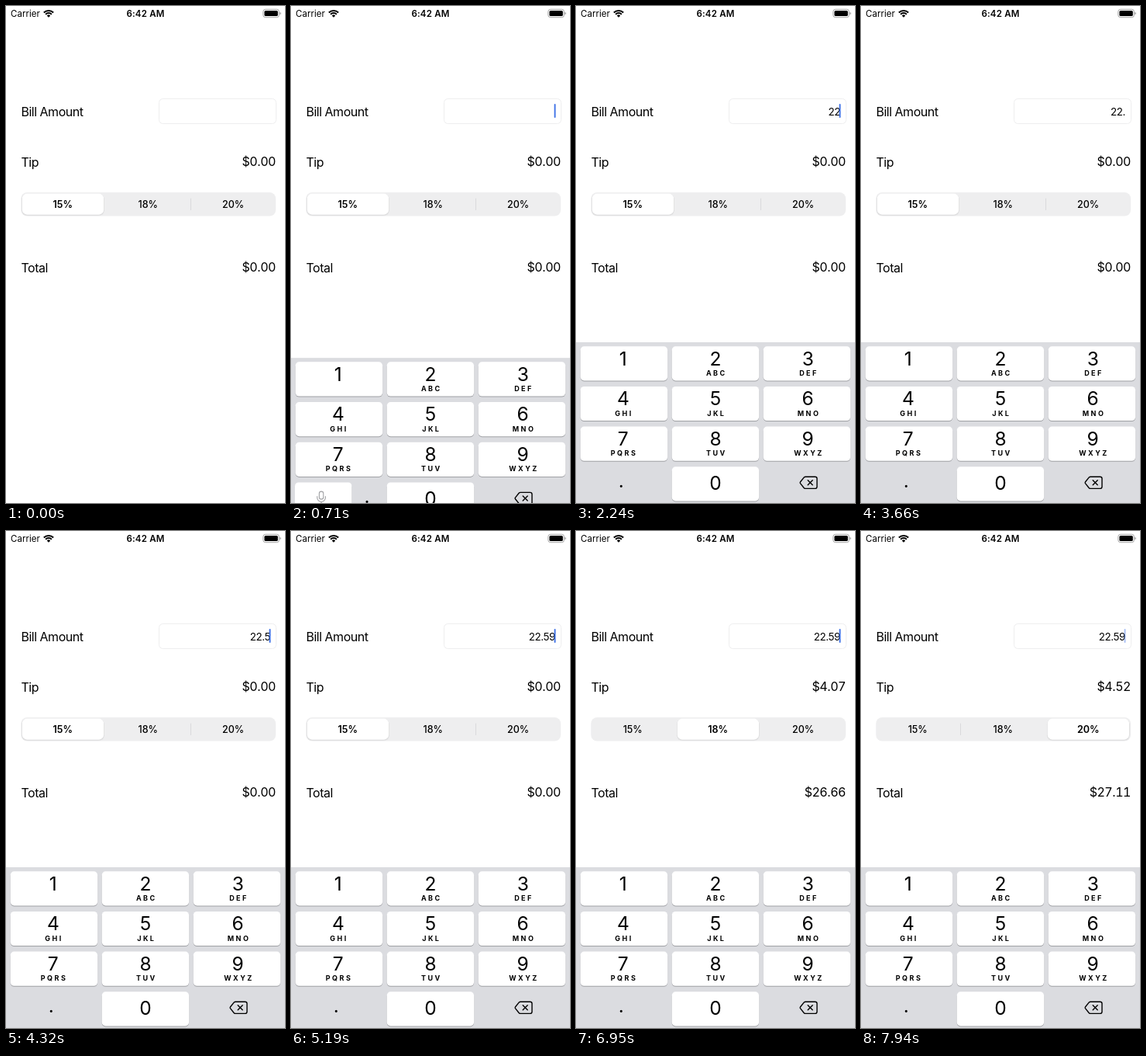
Recreate the animation shown at these times as an HTML page. Size 360 px wide and 640 px high, loop 8000 ms.

```html
<!DOCTYPE html>
<html lang="en">
<head>
<meta charset="utf-8">
<title>Tip calculator</title>
<style>
  html, body { margin: 0; width: 100%; height: 100%; overflow: hidden; background: #fff; }
  svg { display: block; width: 100%; height: 100%; }
  text { font-family: Inter, Roboto, "Liberation Sans", sans-serif; fill: #000; white-space: pre; }
  .body { font-size: 16px; letter-spacing: -.45px; font-variant-numeric: tabular-nums; }
  .field { font-size: 13.4px; letter-spacing: -.42px; }
  .seg { font-size: 12.5px; }
  .digit { font-size: 24.5px; }
  .sub { font-size: 9px; font-weight: 700; letter-spacing: 2.5px; }
  .status { font-size: 11.5px; }
  .end { text-anchor: end; }
  .mid { text-anchor: middle; }
  .line { fill: none; stroke: #000; stroke-linecap: round; stroke-linejoin: round; }
</style>
</head>
<body>
<svg id="stage" viewBox="0 0 360 640" xmlns="http://www.w3.org/2000/svg"></svg>
<script>
const LOOP = 8000;
const stage = document.getElementById('stage');

function add(parent, tag, attrs, text) {
  const el = document.createElementNS('http://www.w3.org/2000/svg', tag);
  set(el, attrs);
  if (text !== undefined) el.textContent = text;
  parent.appendChild(el);
  return el;
}
function set(el, attrs) {
  for (const name in attrs) el.setAttribute(name, attrs[name]);
}
const label = (parent, x, y, cls, text, more) =>
  add(parent, 'text', { x, y, class: cls, ...more }, text);
const box = (parent, x, y, width, height, rx, fill, more) =>
  add(parent, 'rect', { x, y, width, height, rx, fill, ...more });

const clamp = v => Math.max(0, Math.min(1, v));
const smooth = v => { v = clamp(v); return v * v * (3 - 2 * v); };
// Last value whose time has come, from [time, value] pairs.
const at = (steps, t) => steps.reduce((now, [time, value]) => t >= time ? value : now, steps[0][1]);
// Holds the time between the moments at which the screen refreshes.
const held = (stops, t) => stops.reduce((now, stop) => t >= stop ? stop : now, 0);

// Status bar
label(stage, 6, 14, 'status', 'Carrier', { 'letter-spacing': .05 });
const wifi = (r, width) => {
  const d = r * Math.SQRT1_2;
  add(stage, 'path', {
    d: `M${55 - d} ${14.6 - d}A${r} ${r} 0 0 1 ${55 + d} ${14.6 - d}`,
    fill: 'none', stroke: '#000', 'stroke-width': width
  });
};
wifi(8.7, 2);
wifi(5.5, 2);
add(stage, 'path', { d: 'M55 14.8L52.8 12.4A3.1 3.1 0 0 1 57.2 12.4Z' });
label(stage, 180, 14, 'status mid', '6:42 AM', { 'font-weight': 600, 'letter-spacing': .2 });
box(stage, 331.8, 4.3, 20.6, 10.4, 3, 'none', { stroke: '#a4a4a4', 'stroke-width': 1 });
box(stage, 333.4, 5.9, 17.4, 7.2, 1.7, '#000');
add(stage, 'path', { d: 'M353.4 7.7Q355 8.3 355 9.5Q355 10.7 353.4 11.3Z', fill: '#a4a4a4' });

// Form
label(stage, 19.4, 141.6, 'body', 'Bill Amount');
label(stage, 19.4, 207, 'body', 'Tip');
label(stage, 19.4, 343.2, 'body', 'Total');
const tip = label(stage, 348, 206.2, 'body end', '');
const total = label(stage, 348, 342.4, 'body end', '');

box(stage, 197.5, 119.5, 151, 32, 5, '#fff', { stroke: '#eeeeef', 'stroke-width': 1 });
const amount = label(stage, 341, 140.6, 'field end', '');
const caret = box(stage, 339.6, 126, 1.9, 18, 1, '#3f72e6');

// Segmented control
const rates = [15, 18, 20];
box(stage, 19.3, 240, 328.8, 30.5, 8, '#eeeeef');
const dividers = [128, 238].map(x => box(stage, x, 247.5, 1, 15.5, .5, '#d9d9dc'));
const pill = add(stage, 'g', {});
box(pill, 20, 242.3, 107, 28, 7, '#000', { opacity: .035 });
box(pill, 20.4, 241.8, 106.2, 27.8, 7, '#000', { opacity: .07 });
box(pill, 20.8, 241.5, 105.4, 27.2, 6.5, '#fff');
const segs = rates.map((rate, i) => label(stage, 73.2 + 110 * i, 259.7, 'seg mid', rate + '%'));

// Keyboard
const board = add(stage, 'g', {});
box(board, 0, 433, 360, 210, 0, '#dbdce0');
function key(parent, x, y, width) {
  box(parent, x, y + 1, width, 44.2, 4.8, '#a0a1a5');
  return box(parent, x, y, width, 44.2, 4.8, '#fff');
}
const keys = {};
const letters = ['', 'ABC', 'DEF', 'GHI', 'JKL', 'MNO', 'PQRS', 'TUV', 'WXYZ'];
const rowY = row => 438.2 + 51.7 * row;
const colX = col => 5.7 + 118 * col;
letters.forEach((sub, i) => {
  const col = i % 3, y = rowY(Math.floor(i / 3)), cx = 60.8 + 119.2 * col;
  keys[i + 1] = key(board, colX(col), y, 112.4);
  label(board, cx, y + 24.3, 'digit mid', i + 1);
  if (sub) label(board, cx + 1.3, y + 37.6, 'sub mid', sub);
});
key(board, colX(1), rowY(3), 112.4);
label(board, 180, 623.2, 'digit mid', 0);

const mic = add(board, 'g', {});
key(mic, 5, rowY(3), 73.5);
const micLine = { class: 'line', style: 'stroke:#a0a1a4', 'stroke-width': 1.1 };
box(mic, 36.4, 605, 5.4, 10, 2.7, 'none', micLine);
add(mic, 'path', { d: 'M33.8 611.5V613A5.3 5.3 0 0 0 44.4 613V611.5M39.1 618.3V621M36 621H42.2', ...micLine });
const dot = label(board, 0, 620, 'digit mid', '.');
add(board, 'path', {
  d: 'M296 606.2H308.6Q311 606.2 311 608.6V619Q311 621.4 308.6 621.4H296Q295 621.4 294.3 620.7L289.4 614.6Q288.9 613.8 289.4 613L294.3 606.9Q295 606.2 296 606.2Z'
    + 'M299.2 610.8L305.2 616.8M305.2 610.8L299.2 616.8',
  class: 'line', 'stroke-width': 1.4
});

// Timeline
const typed = [[0, ''], [2030, '2'], [2240, '22'], [3030, '22.'], [4320, '22.5'], [5190, '22.59']];
const presses = { 2: [1760, 2240], 5: [4080, 4320], 9: [4840, 5190] };
const caretSteps = [
  [0, 0], [500, 1], [2810, 0], [2920, .5], [3030, 1], [3660, 0], [3900, .5], [4080, 1],
  [4730, 0], [4840, 1], [5580, 0], [5820, .35], [5930, .7], [6140, 1],
  [6670, 0], [6950, 1], [7700, 0], [7940, .45]
];
const riseStops = [500, 600, 710, 830, 930, 1040, 1150];
const slideStops = [6140, 6240, 6350, 6460, 6560, 6670, 7250, 7360, 7470, 7590, 7700, 7820, 7940];
const picks = [[0, 0], [6350, 1], [7470, 2]];
const touches = [[0, -1], [6240, 1], [6350, -1], [7360, 2], [7470, -1]];

function render(t) {
  const rise = held(riseStops, t);
  const spring = Math.max(0, rise - 495) * .01826;
  const hidden = (1 + spring) * Math.exp(-spring);
  const morph = clamp((rise - 730) / 400);
  set(board, { transform: `translate(0 ${(207.4 * hidden).toFixed(2)})`, display: t < 500 ? 'none' : 'inline' });
  set(mic, { opacity: 1 - morph });
  set(dot, { x: 98 - 39.8 * morph });
  for (const k in presses) {
    const [down, up] = presses[k];
    set(keys[k], { fill: t >= down && t < up ? '#b4b8c2' : '#fff' });
  }

  amount.textContent = at(typed, t);
  set(caret, { opacity: at(caretSteps, t) });

  const pick = at(picks, t), touch = at(touches, t);
  const slide = held(slideStops, t);
  const pos = smooth((slide - 6290) / 340) + smooth((slide - 7410) / 340);
  set(pill, { transform: `translate(${(109.9 * pos).toFixed(2)} 0)` });
  dividers.forEach((el, i) => set(el, { opacity: clamp(Math.abs(pos - i - .5) - .5) }));
  segs.forEach((el, i) => set(el, {
    'font-weight': i === pick ? 600 : 500,
    opacity: i === touch ? .3 : 1
  }));

  const bill = pick ? 22.59 : 0;
  const extra = bill * rates[pick] / 100;
  tip.textContent = '$' + extra.toFixed(2);
  total.textContent = '$' + (bill + extra).toFixed(2);
}

const start = performance.now();
function tick() {
  render((performance.now() - start) % LOOP);
  requestAnimationFrame(tick);
}
tick();
</script>
</body>
</html>
```
